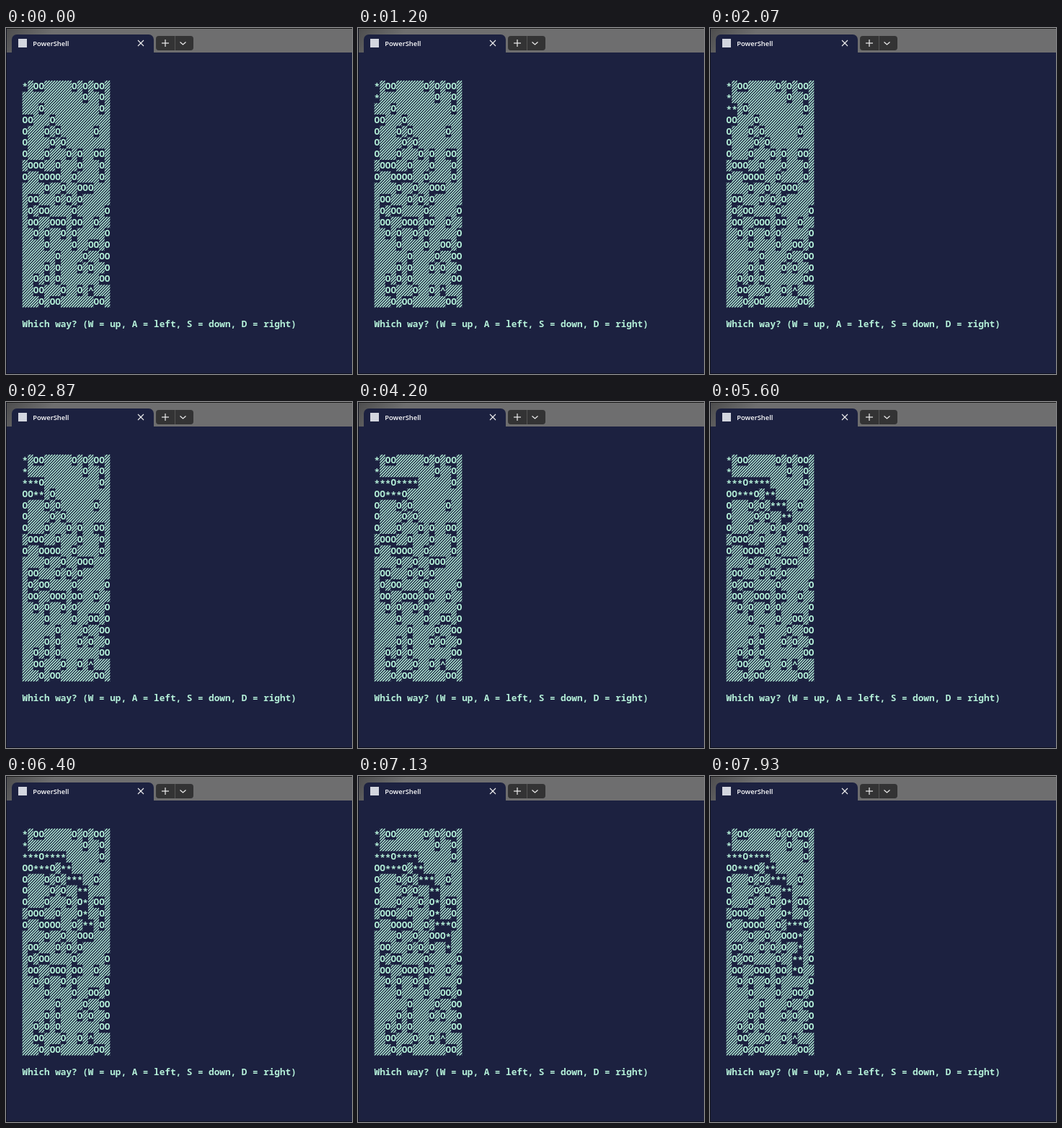
Write an HTML page with a canvas that moves like this. It is 480x480 px and loops after 8000 ms.

```html
<!DOCTYPE html>
<html lang="en">
<head>
<meta charset="utf-8">
<title>Terminal maze</title>
<style>
  html, body { margin: 0; width: 100%; height: 100%; overflow: hidden; background: #1c2140; }
  canvas { display: block; }
</style>
</head>
<body>
<canvas width="480" height="480"></canvas>
<script>
const ctx = document.querySelector('canvas').getContext('2d');
const LOOP = 8000, LEFT = 22.6, TOP = 72.8, CELL_W = 7.61, CELL_H = 15.75;
const NAVY = '#1c2140', MINT = '#b5f1d9';

const maze = [
  '*.OO.....O.O.OO.',
  '...........O..O.',
  '...O..........O.',
  'OO...O..........',
  'O...O.O......O..',
  'O....O.O........',
  'O...O...O.O..OO.',
  '.OOO..O...O...O.',
  'O..OOOO..O....O.',
  '....O..O..OOO...',
  '.OO...O.O.O.....',
  '.O.OO....O.....O',
  '.OO..OOO.OO..O..',
  '..O.O..O.O.....O',
  '....O....O..OO.O',
  '......O....O..OO',
  '....O.O...O.O..O',
  '..O.O.O.......OO',
  '..OO...O..O.^...',
  '...O.OO......OO.'
];

// One key press per entry of times
const moves = 'SSDDSDDWDDDSDSDDSDSSSDDSSSAS';
const times = [
  1200, 1470, 1800, 2470, 2600, 2800, 2930, 3270, 3670, 3870, 4070, 4470, 4670, 4870,
  5070, 5200, 5400, 5530, 5730, 5930, 6130, 6330, 6530, 6800, 7070, 7270, 7530, 7730
];
const steps = { W: [0, -1], A: [-1, 0], S: [0, 1], D: [1, 0] };

function line(color, width, ...points) {
  ctx.strokeStyle = color;
  ctx.lineWidth = width;
  ctx.beginPath();
  points.forEach(([x, y]) => ctx.lineTo(x, y));
  ctx.stroke();
}

function box(color, x, y, w, h, radius) {
  ctx.fillStyle = color;
  ctx.beginPath();
  ctx.roundRect(x, y, w, h, radius);
  ctx.fill();
}

function drawWindow() {
  box(NAVY, 0, 0, 480, 480, 0);
  const bar = ctx.createLinearGradient(0, 0, 40, 34);
  bar.addColorStop(0, '#4c4c4d');
  bar.addColorStop(1, '#6e6e6f');
  box(bar, 0, 0, 480, 34, 0);
  box('#151515', 0, 0, 480, 1, 0);
  box('#10121f', 0, 0, 1, 480, 0);
  box('#10121f', 0, 479, 480, 1, 0);

  box(NAVY, 8, 9, 197, 26, [7, 7, 0, 0]);
  box('#d3d6df', 17, 15, 12, 12, 0);
  ctx.fillStyle = '#fff';
  ctx.font = '600 9.4px "Open Sans", sans-serif';
  ctx.textAlign = 'left';
  ctx.fillText('PowerShell', 37.3, 24.5);
  line('#eee', 1.1, [183, 17], [191, 25]);
  line('#eee', 1.1, [191, 17], [183, 25]);

  box('#333334', 208, 11, 52, 20, 4);
  line('#555', 1, [234.5, 11], [234.5, 31]);
  line('#eee', 1.2, [216, 21], [226, 21]);
  line('#eee', 1.2, [221, 16], [221, 26]);
  line('#eee', 1.2, [241.5, 19.5], [245.5, 23], [249.5, 19.5]);
}

function gridAt(time) {
  const grid = maze.map(row => [...row]);
  let x = 0, y = 0;
  times.forEach((start, i) => {
    if (time < start) return;
    const [dx, dy] = steps[moves[i]];
    x += dx;
    y += dy;
    grid[y][x] = '*';
  });
  return grid;
}

function drawMaze(grid) {
  const hatch = new Path2D();
  ctx.fillStyle = MINT;
  ctx.font = '600 12.68px "Noto Sans Mono", monospace';
  ctx.textAlign = 'center';
  grid.forEach((row, r) => row.forEach((char, c) => {
    const x = LEFT + c * CELL_W, y = TOP + r * CELL_H;
    if (char === '.') hatch.rect(x, y, CELL_W, CELL_H);
    else ctx.fillText(char, x + CELL_W / 2, y + (char === '*' ? 13.5 : 11.9));
  }));
  ctx.textAlign = 'left';
  ctx.fillText('Which way? (W = up, A = left, S = down, D = right)', LEFT, TOP + 21 * CELL_H + 11.9);

  ctx.save();
  ctx.clip(hatch);
  const height = CELL_H * maze.length, width = CELL_W * 16;
  for (let x = LEFT; x < LEFT + width + height; x += CELL_W / 2) {
    line(MINT, 1.4, [x, TOP], [x - height * CELL_W * 2 / CELL_H, TOP + height]);
  }
  ctx.restore();
}

function frame() {
  drawWindow();
  drawMaze(gridAt(performance.now() % LOOP));
  requestAnimationFrame(frame);
}
frame();
</script>
</body>
</html>
```
